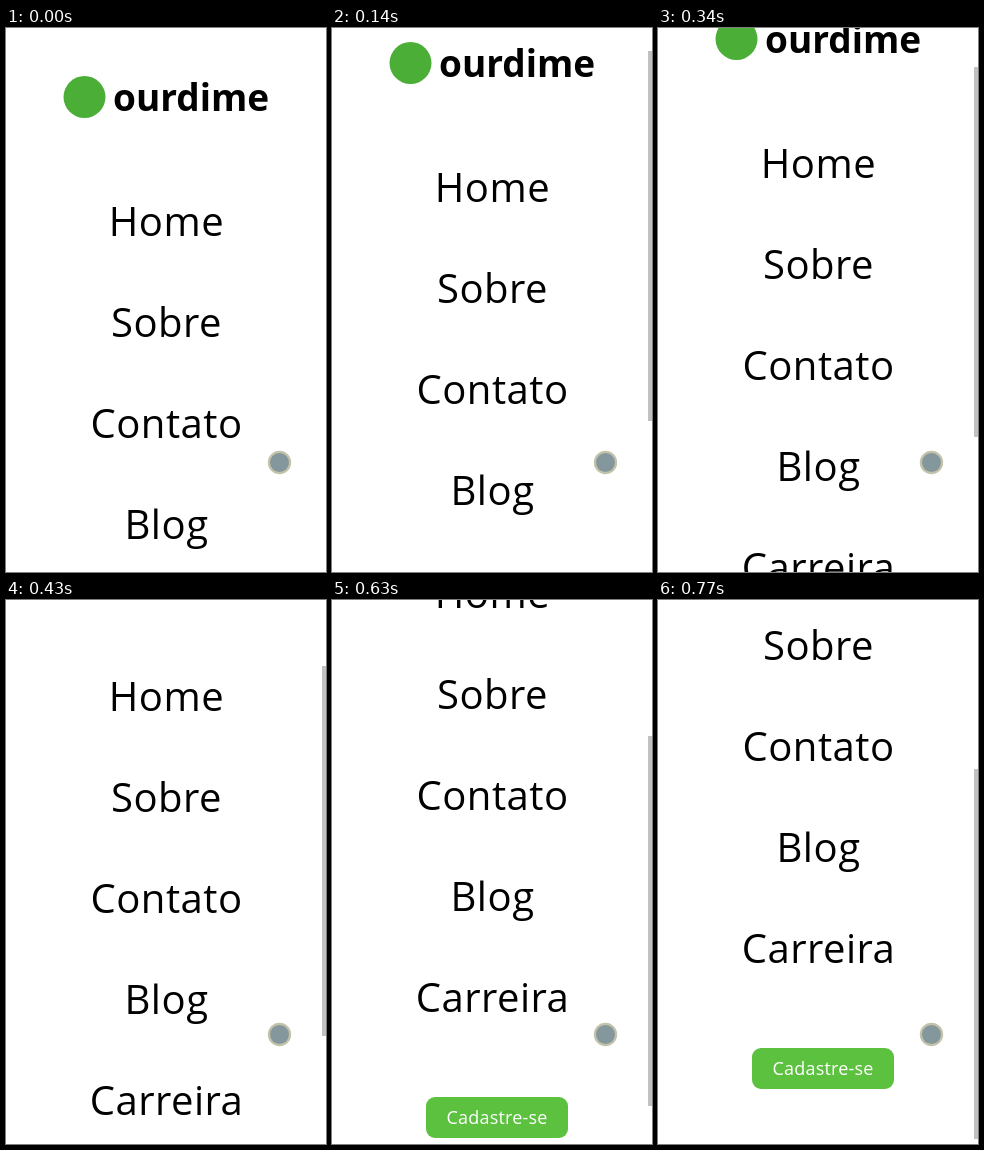
Recreate the animation shown at these times as an HTML page with a canvas. Size 320 by 544 pixels, loop 840 ms.

```html
<!DOCTYPE html>
<html lang="pt-BR">
<head>
<meta charset="utf-8">
<title>Menu</title>
<style>
  html, body { margin: 0; width: 100%; height: 100%; overflow: hidden; background: #fff; }
  canvas { display: block; }
</style>
</head>
<body>
<canvas id="stage" width="320" height="544"></canvas>
<script>
const WIDTH = 320, HEIGHT = 544, LOOP = 840;
const CONTENT_HEIGHT = 800, CENTER = 160.5;
const ctx = document.getElementById('stage').getContext('2d');

// Start time in ms and scroll offset of each held position.
const scrollSteps = [
  [0, 0], [70, 14], [140, 34], [210, 46], [340, 58], [360, 74],
  [430, 97], [500, 131], [570, 166], [630, 200], [700, 225], [770, 249]
];
const links = ['Home', 'Sobre', 'Contato', 'Blog', 'Carreira'];

function scrollAt(time) {
  return scrollSteps.findLast(([start]) => start <= time)[1];
}

function disc(x, y, radius, color) {
  ctx.fillStyle = color;
  ctx.beginPath();
  ctx.arc(x, y, radius, 0, Math.PI * 2);
  ctx.fill();
}

function label(text, x, baseline, { size, weight = 400, color = '#000', align = 'center', spacing = 0 }) {
  ctx.font = `${weight} ${size}px "Open Sans", sans-serif`;
  ctx.letterSpacing = `${spacing}px`;
  ctx.textAlign = align;
  ctx.fillStyle = color;
  ctx.fillText(text, x, baseline);
}

function drawPage() {
  disc(78.5, 69, 21, '#4bae36');
  label('ourdime', 107, 83, { size: 37, weight: 700, align: 'left' });

  links.forEach((text, i) =>
    label(text, CENTER, 208 + i * 101, { size: 40, spacing: 0.5 }));

  ctx.fillStyle = '#5bc13f';
  ctx.beginPath();
  ctx.roundRect(94, 697, 142, 41, 9);
  ctx.fill();
  label('Cadastre-se', 165, 724, { size: 18, color: '#fff', spacing: 0.2 });
}

function drawScrollbar(offset) {
  if (!offset) return;
  const scale = HEIGHT / CONTENT_HEIGHT;
  ctx.fillStyle = '#c0c1c0';
  ctx.fillRect(316, Math.round(offset * scale), 4, Math.round(HEIGHT * scale));
}

function drawPointer() {
  disc(273.5, 434.5, 11.7, '#c3c3aa');
  disc(273.5, 434.5, 9.5, '#84979d');
}

function render(now) {
  const offset = scrollAt(now % LOOP);
  ctx.fillStyle = '#fff';
  ctx.fillRect(0, 0, WIDTH, HEIGHT);
  ctx.save();
  ctx.translate(0, -offset);
  drawPage();
  ctx.restore();
  drawScrollbar(offset);
  drawPointer();
}

let startTime;
function tick(now) {
  startTime ??= now;
  render(now - startTime);
  requestAnimationFrame(tick);
}
render(0);
requestAnimationFrame(tick);
</script>
</body>
</html>
```
